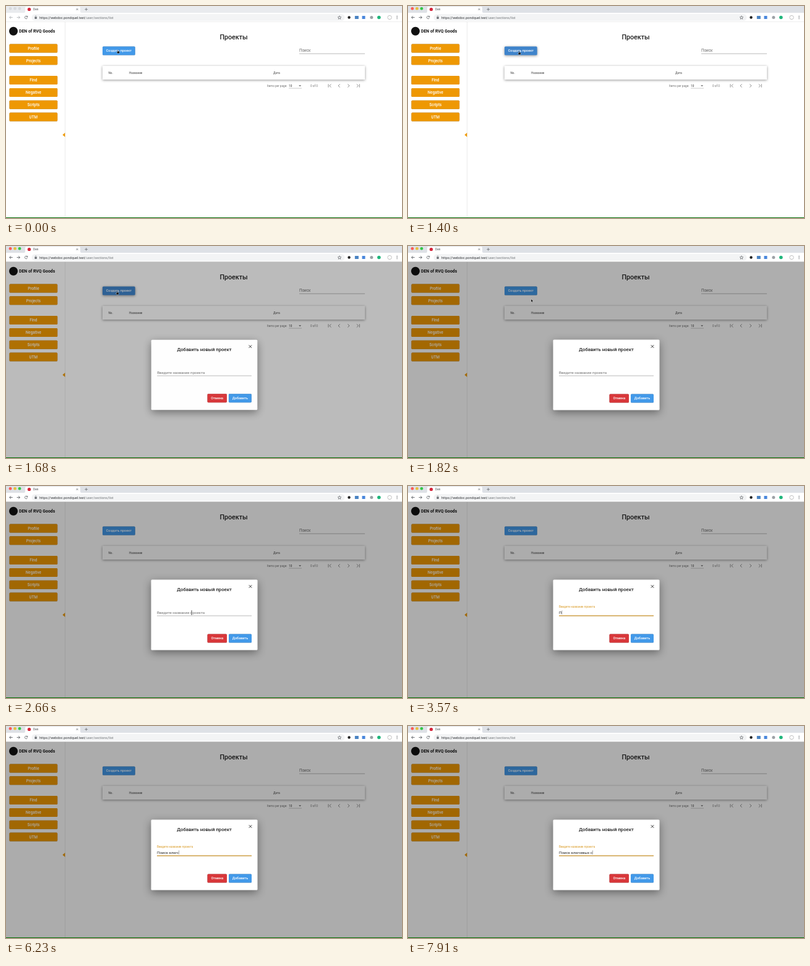
Recreate the animation shown at these times as an HTML page. Size 640 by 343 pixels, loop 8000 ms.

```html
<!DOCTYPE html>
<html lang="ru">
<head>
<meta charset="utf-8">
<title>Den</title>
<style>
  html, body { margin: 0; width: 100%; height: 100%; overflow: hidden; background: #fff; }
  svg { display: block; width: 100vw; height: 100vh; font-family: Roboto, "Noto Sans", sans-serif; }
  .low { filter: drop-shadow(0 .6px .7px rgba(0,0,0,.42)); }
  .card { filter: drop-shadow(0 1.5px 2.2px rgba(0,0,0,.42)); }
  .high { filter: drop-shadow(0 4px 7px rgba(0,0,0,.42)); }
  .line { fill: none; stroke: #5f6368; stroke-width: .9; }
</style>
</head>
<body>
<svg id="stage" viewBox="0 0 640 343" preserveAspectRatio="none">
  <rect width="640" height="343" fill="#fff"/>
  <g id="browser"></g>
  <g id="page"></g>
  <rect id="shade" y="25.5" width="640" height="317"/>
  <g id="dialog"></g>
  <rect y="342" width="640" height="1" fill="#087008"/>
  <g id="cursor">
    <path id="arrow" d="M0 0V5.2L1.2 4.2 2 6 2.9 5.6 2.1 3.9H3.7Z" fill="#000" stroke="#fff" stroke-width=".4"/>
    <path id="hand" d="M-.5 0Q0-.6.5 0V2L2.7 2.6Q3 4.2 2.2 5.8H-.6L-2 3.4-1.4 2.9-.5 3.6Z" fill="#000" stroke="#fff" stroke-width=".4"/>
    <path id="beam" d="M-1-3H1M0-3V3M-1 3H1" fill="none" stroke="#222" stroke-width=".6"/>
  </g>
</svg>
<script>
const LOOP = 8000;
const ACTIVE = 840, PRESS = 1370, OPEN = 1550, FOCUS = 2950, TYPE = 3500, KEY = 290;
const PHRASE = 'Поиск ключевых с';
const ORANGE = '#ee9803', BLUE = '#4299e9';

const $ = id => document.getElementById(id);
const set = (el, attrs) => {
  for (const key in attrs) el.setAttribute(key, attrs[key]);
  return el;
};
const add = (parent, tag, attrs) =>
  parent.appendChild(set(document.createElementNS('http://www.w3.org/2000/svg', tag), attrs));
const rect = (parent, x, y, width, height, fill, more) =>
  add(parent, 'rect', { x, y, width, height, fill, ...more });
const dot = (parent, cx, cy, r, fill, more) => add(parent, 'circle', { cx, cy, r, fill, ...more });
const path = (parent, d, more) => add(parent, 'path', { d, class: 'line', ...more });
const text = (parent, x, y, size, fill, label, more) => {
  const el = add(parent, 'text', { x, y, 'font-size': size, fill, ...more });
  el.textContent = label;
  return el;
};
const button = (parent, x, y, width, fill, label, size) => {
  const box = rect(parent, x, y, width, 14, fill, { rx: 1.5, class: 'low' });
  text(parent, x + width / 2, y + 7 + size * .36, size, '#fff', label,
    { 'text-anchor': 'middle', 'font-weight': 500 });
  return box;
};

const clamp = v => Math.max(0, Math.min(1, v));
const span = (t, start, length) => clamp((t - start) / length);
const mix = (a, b, p) => a + (b - a) * p;
const smooth = p => p * p * (3 - 2 * p);

// CSS-style cubic-bezier easing
function bezier(x1, y1, x2, y2) {
  const curve = (a, b, s) => 3 * a * s * (1 - s) ** 2 + 3 * b * s * s * (1 - s) + s ** 3;
  return x => {
    let lo = 0, hi = 1;
    for (let i = 0; i < 20; i++) {
      const mid = (lo + hi) / 2;
      if (curve(x1, x2, mid) < x) lo = mid; else hi = mid;
    }
    return curve(y1, y2, (lo + hi) / 2);
  };
}
const swift = bezier(.25, .8, .25, 1);
const decelerate = bezier(0, 0, .2, 1);

function buildBrowser(g) {
  const strip = rect(g, 0, 0, 640, 11, '#dee1e6');
  const lights = ['#fc5b57', '#e5bf3c', '#35c84a'].map((color, i) => {
    const el = dot(g, 7 + i * 7.5, 4.2, 2.4, color);
    return { el, color };
  });
  path(g, 'M29 11Q31 11 31 9V3Q31 1 33 1H118Q120 1 120 3V9Q120 11 122 11Z', { style: 'fill:#fff;stroke:none' });
  dot(g, 37.5, 5.4, 2.7, '#d6283c');
  text(g, 44, 7.2, 4.8, '#45494d', 'Den');
  path(g, 'M113.6 4 116.4 6.8M116.4 4 113.6 6.8M127.3 5.4H132.1M129.7 3V7.8', { style: 'stroke-width:.7' });
  rect(g, 41.5, 13, 506, 11, '#f3f4f5', { rx: 5.5 });
  const nav = path(g, 'M10.7 18.5H5.8M8 16.2 5.7 18.5 8 20.8M17.5 18.5H22.4M20.2 16.2 22.5 18.5 20.2 20.8');
  path(g, 'M34.4 17.2A2.2 2.2 0 1 0 34.6 19.3M34.8 15.8V17.8H32.8', { style: 'stroke-width:.8' });
  rect(g, 46.4, 17.9, 3.4, 2.8, '#5f6368', { rx: .4 });
  path(g, 'M47.1 18V17A1 1 0 0 1 49.1 17V18', { style: 'stroke-width:.6' });
  const url = text(g, 54, 20.5, 5.6, '#303336', 'https://webdoc.pondquel.test');
  const tail = add(url, 'tspan', { fill: '#73777b' });
  tail.textContent = '/user/sections/list';
  path(g, 'M539 15.8 539.8 17.7 541.8 17.9 540.3 19.2 540.8 21.2 539 20.1 537.2 21.2 537.7 19.2 536.2 17.9 538.2 17.7Z',
    { style: 'stroke-width:.7' });
  dot(g, 554.5, 18.5, 2.2, '#222');
  rect(g, 563.8, 16, 6, 5, '#4a83c2');
  rect(g, 575.5, 16, 5, 5, '#4a87dc');
  dot(g, 590.8, 18.5, 2.5, '#9da2a6');
  dot(g, 602.8, 18.5, 2.8, '#20b67c');
  dot(g, 620, 18.5, 3.2, '#fff', { stroke: '#aaa', 'stroke-width': .7 });
  [16.4, 18.5, 20.6].forEach(y => dot(g, 632, y, .7, '#5f6368'));
  rect(g, 0, 25, 640, .5, '#dcdcdc');
  return { strip, lights, nav };
}

function buildPage(g) {
  rect(g, 95.2, 25.5, .6, 316.5, '#dedede');
  dot(g, 12, 40.7, 7, '#111');
  text(g, 21, 43.2, 6.9, '#111', 'DEN of RVQ Goods', { 'font-weight': 700 });
  const menu = { Profile: 61.6, Projects: 81.3, Find: 113.1, Negative: 133, Scripts: 152.7, UTM: 172.5 };
  for (const name in menu) button(g, 5.5, menu[name], 77.7, ORANGE, name, 6.3);
  path(g, 'M95.4 205V212L91.4 208.5Z', { style: `fill:${ORANGE};stroke:none` });

  text(g, 368, 54.3, 10.7, '#202020', 'Проекты', { 'text-anchor': 'middle', 'font-weight': 500 });
  const create = button(g, 156, 65.4, 52.7, BLUE, 'Создать проект', 5.5);
  text(g, 474, 73.7, 6.3, '#6a6a6a', 'Поиск');
  rect(g, 474, 76.8, 106, .6, '#8d8d8d');

  rect(g, 156, 97, 424, 22, '#fff', { class: 'card' });
  const head = { 'No.': 165.5, 'Название': 199, 'Дата': 432 };
  for (const name in head) text(g, head[name], 109.6, 4.7, '#666', name, { 'font-weight': 500 });

  text(g, 422, 130.7, 4.7, '#707070', 'Items per page:');
  text(g, 457, 130.7, 4.7, '#333', '10');
  rect(g, 457, 132.8, 21, .5, '#999');
  path(g, 'M473.2 128.2H477L475.1 130.2Z', { style: 'fill:#666;stroke:none' });
  text(g, 492, 130.7, 4.7, '#707070', '0 of 0');
  path(g, 'M521 126.3V131.7M525.5 126.4 522.8 129 525.5 131.6M539.7 126.4 537 129 539.7 131.6' +
    'M552.3 126.4 555 129 552.3 131.6M566.8 126.4 569.5 129 566.8 131.6M571.3 126.3V131.7',
    { style: 'stroke:#777;stroke-width:.8' });
  return { create };
}

function buildDialog(g) {
  rect(g, 234.5, 151.5, 172, 114, '#fff', { rx: 1.6, class: 'high' });
  text(g, 320.5, 169.7, 7.7, '#202020', 'Добавить новый проект', { 'text-anchor': 'middle', 'font-weight': 500 });
  path(g, 'M392.7 160.2 397.3 164.8M397.3 160.2 392.7 164.8', { style: 'stroke:#222;stroke-width:.9' });
  const label = text(g, 0, 0, 6.15, '#707070', 'Введите название проекта');
  rect(g, 244, 209.7, 153, .6, '#8d8d8d');
  const focusLine = rect(g, 244, 209.4, 153, 1.1, '#d99a24');
  const input = text(g, 244, 206.6, 6.15, '#222', '');
  const caret = rect(g, 244, 201.3, .5, 6.5, '#555');
  button(g, 325.5, 239.4, 31.5, '#d8373a', 'Отмена', 5.5);
  button(g, 360, 239.4, 37, BLUE, 'Добавить', 5.5);
  return { label, focusLine, input, caret };
}

const browser = buildBrowser($('browser'));
const page = buildPage($('page'));
const form = buildDialog($('dialog'));

function drawBrowser(t) {
  const active = t >= ACTIVE;
  set(browser.strip, { fill: active ? '#dee1e6' : '#e9ebee' });
  browser.lights.forEach(({ el, color }) => set(el, { fill: active ? color : '#d8dadd' }));
  browser.nav.style.stroke = active ? '#5f6368' : '#b4b7ba';
  const pressed = t >= PRESS && t < 1750;
  set(page.create, { fill: pressed ? '#3f84cb' : BLUE, class: pressed ? 'card' : 'low' });
}

function drawDialog(t) {
  set($('shade'), { opacity: .325 * swift(span(t, OPEN, 400)) });
  const p = decelerate(span(t, OPEN, 150));
  const scale = mix(.7, 1, p);
  set($('dialog'), {
    opacity: p,
    visibility: t >= OPEN ? 'visible' : 'hidden',
    transform: `translate(320.5 208.5) scale(${scale}) translate(-320.5 -208.5)`
  });

  const focused = t >= FOCUS;
  const f = swift(span(t, FOCUS, 300));
  set(form.label, {
    fill: focused ? '#d99a24' : '#707070',
    transform: `translate(244 ${mix(206.6, 197.3, f)}) scale(${mix(1, .755, f)})`
  });
  set(form.focusLine, { x: 320.5 - 76.5 * f, width: 153 * f });
  const count = t < TYPE ? 0 : 1 + Math.floor((t - TYPE) / KEY);
  const typed = PHRASE.slice(0, count);
  if (form.input.textContent !== typed) form.input.textContent = typed;
  const trailing = typed.endsWith(' ') ? 1.5 : 0;
  const width = typed ? form.input.getComputedTextLength() : 0;
  set(form.caret, { x: 244.3 + width + trailing, opacity: focused ? 1 : 0 });
}

function drawCursor(t) {
  const settle = smooth(span(t, 700, 500));
  const leave = smooth(span(t, 1680, 280));
  const reach = smooth(span(t, 1960, 640));
  const x = mix(mix(mix(180.8, 179.5, settle), 218, leave), 300, reach);
  const y = mix(mix(mix(71, 73, settle), 98, leave), 205, reach);
  const overField = x > 244 && y > 194;
  const overButton = t < 1700;
  set($('cursor'), { transform: `translate(${x} ${y})`, visibility: t < TYPE - 50 ? 'visible' : 'hidden' });
  set($('hand'), { opacity: +overButton });
  set($('beam'), { opacity: +overField });
  set($('arrow'), { opacity: +(!overButton && !overField) });
}

function draw(t) {
  drawBrowser(t);
  drawDialog(t);
  drawCursor(t);
}

const start = performance.now();
function tick() {
  draw((performance.now() - start) % LOOP);
  requestAnimationFrame(tick);
}
tick();
</script>
</body>
</html>
```
